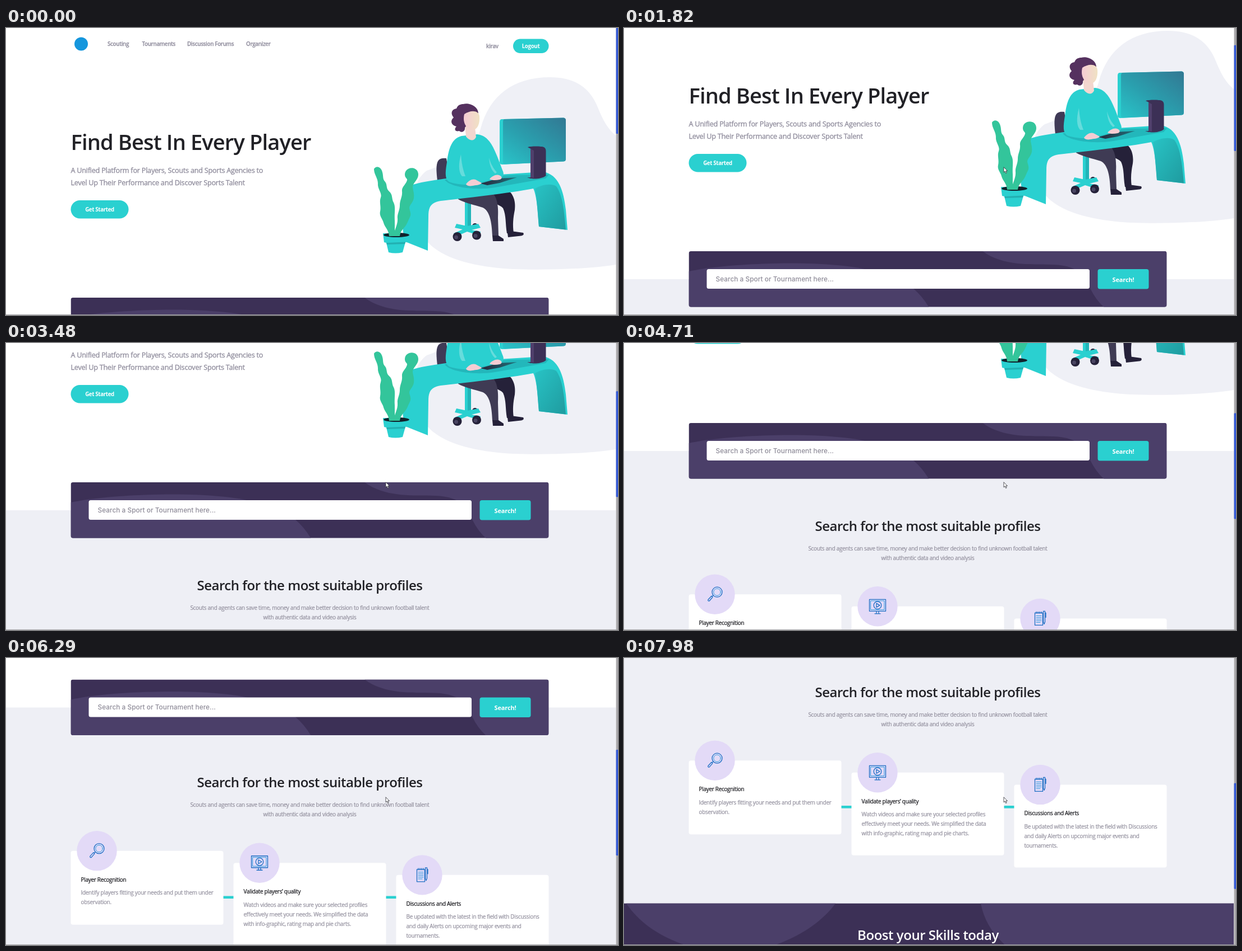
Recreate the animation shown at these times as an HTML page. Size 1091 by 513 pixels, loop 8000 ms.

```html
<!DOCTYPE html>
<html lang="en">
<head>
<meta charset="utf-8">
<title>Scouting landing page</title>
<style>
  html, body { margin: 0; width: 100%; height: 100%; overflow: hidden; background: #fff; }
  svg { display: block; width: 100%; height: 100%; }
  text { font-family: "Open Sans", "Noto Sans", sans-serif; }
  .nav { font-size: 9.8px; font-weight: 600; letter-spacing: -.32px; fill: #918e9e; stroke: #918e9e; stroke-width: .25px; }
  .btn { font-size: 9.7px; font-weight: 700; letter-spacing: -.33px; fill: #fff; text-anchor: middle; }
  .find { font-size: 11px; letter-spacing: -.15px; }
  .title { font-size: 38px; font-weight: 600; letter-spacing: -.84px; fill: #212126; }
  .lead { font-size: 12.6px; letter-spacing: -.22px; fill: #8f8c9c; stroke: #8f8c9c; stroke-width: .32px; }
  .hint { font: 500 11.8px Inter, "Open Sans", sans-serif; letter-spacing: .05px; fill: #8f8c99; }
  .head { font-size: 24px; font-weight: 600; letter-spacing: -.47px; fill: #212126; text-anchor: middle; }
  .white { fill: #fff; }
  .small { font-size: 9.9px; letter-spacing: -.25px; fill: #94919f; stroke: #94919f; stroke-width: .24px; }
  .mid { text-anchor: middle; }
  .name { fill: #17171c; stroke: #17171c; }
  .teal { fill: #2ad0d0; }
  .dark { fill: #3c3056; }
  .plum { fill: #4b3f69; }
  .icon { fill: none; stroke: #1e6fc4; stroke-width: 1.3; stroke-linejoin: round; stroke-linecap: round; }
  .thin { stroke: #2a9be0; stroke-width: 1; }
</style>
</head>
<body>
<svg viewBox="0 0 1091 513">
  <defs>
    <linearGradient id="screen" x1="0" y1="1" x2="1" y2="0">
      <stop offset="0" stop-color="#29c4c9"/><stop offset=".45" stop-color="#2a9fae"/><stop offset="1" stop-color="#327893"/>
    </linearGradient>
    <linearGradient id="leg" x1="0" y1="0" x2="1" y2="1">
      <stop offset="0" stop-color="#28c3c5"/><stop offset="1" stop-color="#1f9b9f"/>
    </linearGradient>
    <linearGradient id="skin">
      <stop offset="0" stop-color="#f5cbd3"/><stop offset="1" stop-color="#f0e2c4"/>
    </linearGradient>
    <linearGradient id="slab">
      <stop offset="0" stop-color="#27263b"/><stop offset="1" stop-color="#20747d"/>
    </linearGradient>
    <clipPath id="panel"><rect width="852" height="99.5" rx="4"/></clipPath>
  </defs>

  <g id="page">
    <rect y="532" width="1087" height="512" fill="#eeeff5"/>

    <circle cx="134" cy="28.5" r="12" fill="#1596dd"/>
    <g class="nav">
      <text x="181" y="31.5">Scouting</text>
      <text x="242.5" y="31.5">Tournaments</text>
      <text x="323" y="31.5">Discussion Forums</text>
      <text x="428" y="31.5">Organizer</text>
      <text x="856" y="36">kirav</text>
    </g>
    <rect class="teal" x="904" y="19.5" width="63.5" height="25.5" rx="12.7"/>
    <text class="btn" x="935.5" y="36">Logout</text>

    <text class="title" x="115.5" y="217.5">Find Best In Every Player</text>
    <text class="lead" x="115.5" y="259.3">A Unified Platform for Players, Scouts and Sports Agencies to</text>
    <text class="lead" x="115.5" y="281">Level Up Their Performance and Discover Sports Talent</text>
    <rect class="teal" x="115.5" y="308" width="103" height="32.5" rx="16.2"/>
    <text class="btn" x="167" y="328.3">Get Started</text>

    <!-- backdrop -->
    <path fill="#eff0f6" d="M846 180C862 120 905 88 970 88C1020 88 1043 112 1055 142C1064 165 1074 182 1087 192V423C1040 431 960 433 905 431C850 428 790 418 757 388C720 350 715 280 750 255C790 240 835 225 846 180Z"/>

    <!-- chair -->
    <path fill="#3f3a56" d="M769 273C765 240 768 231 785 233L792 273Z"/>
    <path fill="#23b4b8" d="M818 300H829V356H818Z"/>
    <path class="teal" d="M818 300H823V356H818Z"/>
    <circle cx="836" cy="354" r="5" fill="#252139"/>
    <path class="teal" d="M803 350L822 354L842 350L846 357L830 361L846 364L844 371L822 364L806 371L798 367L814 360L800 357Z"/>
    <g fill="#252139"><circle cx="804.5" cy="373" r="8"/><circle cx="839" cy="370.5" r="8"/></g>
    <g fill="#4a4562"><circle cx="802.5" cy="374" r="3.5"/><circle cx="837" cy="371.5" r="3.5"/></g>

    <!-- legs -->
    <path fill="#252139" d="M850 285H885C905 291 909 310 907 325C904 340 903 352 905 366L893 367C890 350 892 335 886 322C880 315 865 312 850 306ZM894 366L904 363.5L922 366C924 369 922 371 918 371.5L895 374Z"/>
    <path fill="#3f3b54" d="M806 290H860C877 297 878 320 877 340L878 372H867C866 345 862 327 850 321C835 316 818 313 806 306Z"/>
    <path fill="#252139" d="M867 371L878 371L887 377V381H868Z"/>

    <!-- desk -->
    <path class="teal" d="M722 281C740 275 770 271 800 267L958 257C985 262 994 290 998 325L1001 361L950 355C948 320 945 297 940 287C900 295 810 305 775 309C757 312 753 320 753 337L752 398L712 382C702 350 706 312 722 281Z"/>
    <path fill="url(#leg)" d="M943 287C947 310 948 335 950 355L998 360.6C995 325 992 298 981 283C972 277 955 280 943 287Z"/>
    <path fill="#23b7bb" d="M782 271C790 284 835 291 872 285L962 269L968 262L900 263Z"/>

    <!-- monitor -->
    <path class="teal" d="M884 163L994 160.5Q998 161 998 165V234Q998 238 994 238.5L885 244Q880 244 880 240V168Q880 163 884 163Z"/>
    <path fill="url(#screen)" d="M888 163L994 160.5Q998 161 998 165V234Q998 238 994 238.5L889 243.5Q886 243 886 240V168Q886 164 888 163Z"/>
    <path class="dark" d="M930 213C935 211 955 211 959 213Q962.5 215 962.5 220V264C955 270 942 270 935 269L929 267H937V218C936 215 933 215 930 213Z"/>
    <path fill="#503f6c" d="M935 216L941 219V268L935 267Z"/>

    <!-- person -->
    <path class="teal" d="M812 193C795 197 789 215 786 240C783 258 782 270 790 275C805 281 830 281 835 278L880 269C888 266 888 260 885 254C878 235 871 215 862 203C855 194 848 191 840 190Z"/>
    <g fill="#66dcdc">
      <path d="M811 226C806 245 807 258 813 265H819C814 252 812 240 811 226Z"/>
      <path d="M861 232C862 245 865 254 872 260L875 258C868 250 864 242 861 232Z"/>
    </g>
    <path fill="#f3d6cf" d="M818 174L836 178L838 195C834 203 826 202 820 194Z"/>
    <path fill="#55315f" d="M815 136C826 133 842 140 842 153L826 168L818 178C819 185 812 188 808 184C801 186 798 181 803 176C794 174 791 166 798 160C792 153 794 145 803 144C805 138 810 136 815 136Z"/>
    <path fill="url(#skin)" d="M817 154C827 147 843 146 844 158C845 170 841 181 833 182C822 183 813 170 817 154Z"/>
    <path fill="url(#slab)" d="M846 278L877 269L911 267L880 277L858 281Z"/>
    <path fill="#f5cdd3" d="M820 279C825 272 832 269 837 271L848 277C846 281 836 281 832 282C826 283 821 282 820 279ZM862 270C866 265 874 261 879 263C885 265 885 270 880 271C874 272 868 273 862 270Z"/>

    <!-- plant -->
    <path class="teal" d="M672 367H718.5L716 382L712 383L707 401Q694 404 682 401L678 384L674 383Z"/>
    <path fill="#22b0b2" d="M678 384L712 382.5L711 386L679 387Z"/>
    <ellipse cx="696" cy="370" rx="23" ry="4" fill="#10222c"/>
    <g fill="#33c59b">
      <path d="M656 252C660 245 669 248 671 258C673 265 671 270 676 275C680 280 677 287 683 292C690 298 687 305 691 312C695 320 692 330 693 345V372H683C682 360 675 356 673 348C672 342 665 336 667 328C669 318 665 312 668 303C671 295 662 288 663 278C663 268 656 262 656 252Z"/>
      <path d="M711 262C711 247 735 246 735 262C735 272 725 276 725 285C726 292 728 296 727 304C726 312 719 316 719 322C720 328 723 332 720 338C716 346 716 348 712 354C707 360 703 364 702 372H691C692 360 699 352 698 340C697 333 702 326 702 317C702 307 707 302 706 292C705 284 713 280 715 272C716 269 711 268 711 262Z"/>
    </g>

    <!-- search panel -->
    <g transform="translate(115.5 482)" clip-path="url(#panel)">
      <rect class="dark" width="852" height="100"/>
      <path class="plum" d="M0 36C50 25 130 21.500 180 21.500C240 21.500 290 26 318 33L400 66.500Q416 80 428 100H0Z"/>
      <path class="plum" d="M524 0C560 27 610 23 650 24C700 26 706 48 716 67Q725 86 740 100H852V0Z"/>
      <rect x="32" y="32" width="682.5" height="35" rx="3.5" fill="#fff"/>
      <rect class="teal" x="729" y="32" width="91" height="35.5" rx="4"/>
    </g>
    <text class="hint" x="163.5" y="536">Search a Sport or Tournament here...</text>
    <text class="btn find" x="890" y="536.5">Search!</text>

    <!-- profiles -->
    <text class="head" x="541.5" y="674.5">Search for the most suitable profiles</text>
    <text class="small mid" x="541.5" y="710">Scouts and agents can save time, money and make better decision to find unknown football talent</text>
    <text class="small mid" x="541.5" y="726.7">with authentic data and video analysis</text>
    <rect class="teal" x="380" y="869" width="330" height="4.6"/>
    <g id="cards"></g>

    <!-- skills -->
    <rect class="dark" y="1043.7" width="1087" height="200"/>
    <path class="plum" d="M4 1043.7C30 1082 70 1106 120 1122H258C310 1105 352 1078 377 1043.7Z"/>
    <path class="plum" d="M636 1043.7C642 1075 658 1100 684 1122H1087V1043.7Z"/>
    <text class="head white" x="542" y="1108.5">Boost your Skills today</text>
  </g>

  <rect x="1087.5" width="4" height="513" fill="#aaa8ab"/>
  <rect id="thumb" x="1087.5" width="4" height="189" rx="1" fill="#355bd8"/>
  <rect y="512" width="1091" height="1" fill="#a3a3a6"/>
  <path id="cursor" d="M0 0V9.200L2.100 7.300L3.600 10.800L5.200 10.100L3.700 6.700H6.500Z" fill="#fff" stroke="#2c2c33" stroke-width=".8"/>
</svg>

<script>
const LOOP = 8000;
const $ = id => document.getElementById(id);

const cards = [
  { x: 115.5, y: 788.2, h: 132, name: 'Player Recognition',
    lines: ['Identify players fitting your needs and put them under', 'observation.'],
    icon: '<circle cx="4" cy="-4" r="9"/><circle class="thin" cx="4" cy="-4" r="6.3"/>' +
          '<path d="M-3 2L-5 4M-6 3L-12 9.500Q-13 12 -10 12L-4 5Z"/>' },
  { x: 405.5, y: 809.8, h: 148, name: 'Validate players’ quality',
    lines: ['Watch videos and make sure your selected profiles',
            'effectively meet your needs. We simplified the data',
            'with info-graphic, rating map and pie charts.'],
    icon: '<rect x="-14.5" y="-12.5" width="29" height="21"/><rect class="thin" x="-12" y="-10" width="24" height="16"/>' +
          '<circle cy="-2" r="6.8"/><path d="M-2 -5.500V1.500L4 -2ZM-2 9V12M2 9V12M-5 13H5"/>' },
  { x: 695.5, y: 831.4, h: 148, name: 'Discussions and Alerts',
    lines: ['Be updated with the latest in the field with Discussions',
            'and daily Alerts on upcoming major events and', 'tournaments.'],
    icon: '<rect x="-9.5" y="-10" width="14" height="22"/><path d="M-7 -12V-9M-4 -12V-9M-1 -12V-9M2 -12V-9"/>' +
          '<path class="thin" d="M-7 -5H2M-7 -2H2M-7 1H2M-7 4H2M-7 7H0"/><path d="M5.500 -13H8.500V6L7 10L5.500 6ZM8.500 -10H10V-2"/>' }
];

$('cards').innerHTML = cards.map(c => `<g transform="translate(${c.x} ${c.y})">
  <rect width="272" height="${c.h}" rx="4" fill="#fff"/>
  <circle cx="46.5" r="35.7" fill="#e3daf7"/>
  <g class="icon" transform="translate(46.5 0)">${c.icon}</g>
  <text class="small name" x="18" y="55">${c.name}</text>
  ${c.lines.map((s, i) => `<text class="small" x="18" y="${78.5 + 16.9 * i}">${s}</text>`).join('')}
</g>`).join('');

// start, end, steps, position reached
const scrolls = [
  [1430, 1820, 6, 83], [2310, 2640, 5, 158], [3140, 3480, 5, 233],
  [3970, 4290, 5, 319], [4710, 4970, 4, 376], [5450, 5880, 6, 428],
  [6290, 6630, 5, 482.6], [7040, 7470, 6, 549.3], [7790, 7980, 3, 605]
];

// Steps already shown at time t; they are spread evenly from start to end.
const stepsDone = (t, start, end, n) =>
  t < start ? 0 : Math.min(n, 1 + Math.floor((t - start + 3) / (end - start) * (n - 1)));

const mix = (a, b, p) => a + (b - a) * p;

function scrollAt(t) {
  let y = 0;
  for (const [start, end, n, to] of scrolls) {
    const p = stepsDone(t, start, end, n) / n;
    y = mix(y, to, 1 - (1 - p) ** 1.5);
  }
  return y;
}

function cursorAt(t) {
  const a = Math.max(0, stepsDone(t, 230, 470, 4) - 1) / 3;
  const b = stepsDone(t, 640, 810, 3) / 3;
  return [mix(mix(937.5, 825.5, a), 677, b), mix(mix(413.5, 324.5, a), 248.7, b)];
}

function draw(t) {
  const y = scrollAt(t);
  $('page').setAttribute('transform', `translate(0 ${-y})`);
  $('thumb').setAttribute('y', y * .37);
  $('cursor').setAttribute('transform', `translate(${cursorAt(t)})`);
  $('cursor').setAttribute('visibility', t < 230 ? 'hidden' : 'visible');
}

const begin = performance.now();
function tick() {
  draw((performance.now() - begin) % LOOP);
  requestAnimationFrame(tick);
}
tick();
</script>
</body>
</html>
```
